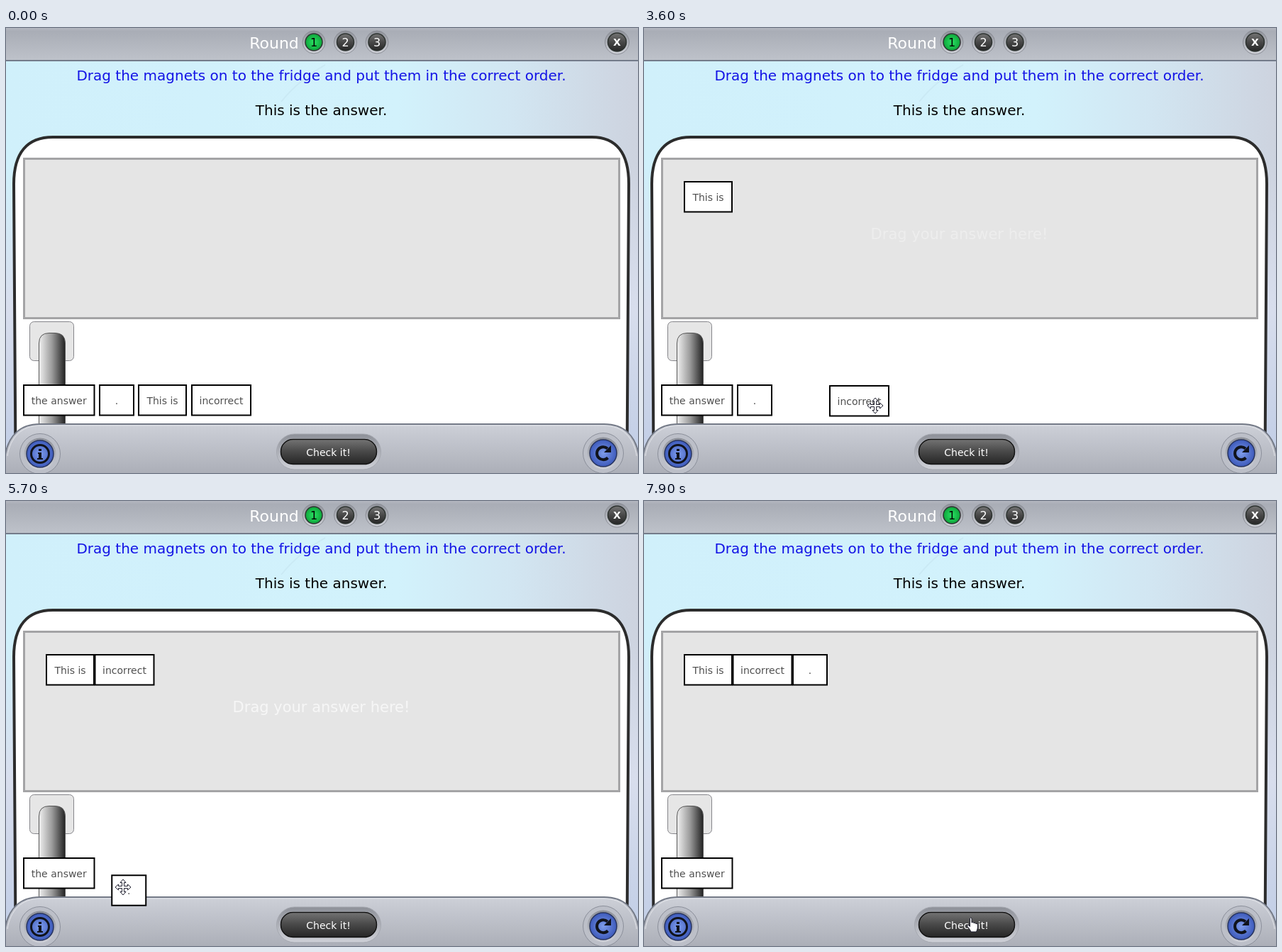
Animation, 891 px wide and 628 px high, one loop 8000 ms. Source, as an HTML page:

```html
<!DOCTYPE html>
<html lang="en">
<head>
<meta charset="utf-8">
<title>Fridge magnets</title>
<style>
html, body { margin: 0; width: 100%; height: 100%; overflow: hidden; }
svg { display: block; font-family: "DejaVu Sans", Verdana, sans-serif; }
text { text-anchor: middle; }
.magnet rect { fill: #fff; stroke: #000; stroke-width: 2; }
.magnet text { font-size: 14px; fill: #505050; }
.cursor { fill: #fff; stroke: #1c1c2c; stroke-width: 1; stroke-linejoin: round; }
</style>
</head>
<body>
<svg id="stage" width="891" height="628" viewBox="0 0 891 628">
  <defs>
    <linearGradient id="sky">
      <stop offset="0" stop-color="#d0f0fb"/><stop offset=".62" stop-color="#d2f2fc"/>
      <stop offset=".8" stop-color="#d2e6f2"/><stop offset="1" stop-color="#cdd3df"/>
    </linearGradient>
    <linearGradient id="haze" x2="0" y2="1">
      <stop offset=".25" stop-color="#d8deed" stop-opacity="0"/><stop offset=".6" stop-color="#d8deed"/>
      <stop offset="1" stop-color="#bfcce5"/>
    </linearGradient>
    <linearGradient id="header" x2="0" y2="1">
      <stop offset="0" stop-color="#b4b7c0"/><stop offset=".1" stop-color="#a9adb6"/>
      <stop offset="1" stop-color="#bec2ca"/>
    </linearGradient>
    <linearGradient id="panel" x2="0" y2="1">
      <stop offset="0" stop-color="#cdd0d8"/><stop offset="1" stop-color="#abaeb7"/>
    </linearGradient>
    <linearGradient id="bar">
      <stop offset="0" stop-color="#f0f0f0"/><stop offset=".5" stop-color="#9a9a9a"/>
      <stop offset="1" stop-color="#222"/>
    </linearGradient>
    <linearGradient id="ring" x2="0" y2="1">
      <stop offset="0" stop-color="#8d9098"/><stop offset="1" stop-color="#cfd1d8"/>
    </linearGradient>
    <linearGradient id="dark" x2="0" y2="1">
      <stop offset="0" stop-color="#747474"/><stop offset=".5" stop-color="#484848"/>
      <stop offset="1" stop-color="#262626"/>
    </linearGradient>
    <radialGradient id="green"><stop offset="0" stop-color="#2be264"/><stop offset="1" stop-color="#0da53a"/></radialGradient>
    <radialGradient id="blue"><stop offset="0" stop-color="#7d9bea"/><stop offset="1" stop-color="#3d5abb"/></radialGradient>
  </defs>

  <rect width="891" height="628" fill="url(#sky)"/>
  <rect y="46" width="891" height="582" fill="url(#haze)"/>
  <path d="M388 104Q412 74 450 52" fill="none" stroke="#c3e2ee" stroke-width="2" opacity=".5"/>

  <rect width="891" height="46" fill="url(#header)"/>
  <path d="M0 46H891" stroke="#737b8a" stroke-width="2"/>
  <text x="378" y="28.5" font-size="22" fill="#fff">Round</text>
  <g id="badges"></g>

  <text x="444.5" y="74" font-size="20" fill="#1414e6">Drag the magnets on to the fridge and put them in the correct order.</text>
  <text x="444.5" y="122.5" font-size="20">This is the answer.</text>

  <path d="M13.5 610L11 220C11 176 30 154 66 154H826C860 154 878 176 878 220L875.5 610" fill="#fff" stroke="#2c2c2c" stroke-width="4"/>
  <rect x="25.5" y="184.5" width="839" height="225" fill="#e5e5e5" stroke="#a4a4a6" stroke-width="3"/>
  <text id="hint" x="444.5" y="298" font-size="21" fill="#fff">Drag your answer here!</text>

  <rect x="33.5" y="414.5" width="62" height="55" rx="6" fill="#e6e6e6" stroke="#85858a"/>
  <path d="M46.5 560V445Q46.5 430.5 61 430.5H69Q83.5 430.5 83.5 445V560" fill="url(#bar)" stroke="#555"/>

  <path d="M-2 608C2 575 20 559 48 559H843C871 559 889 575 893 608V630H-2Z" fill="url(#panel)" stroke="#747a87" stroke-width="2"/>
  <path d="M2 604C6 578 22 561 48 561H843C869 561 885 578 889 604" fill="none" stroke="#e3e5ea"/>

  <rect x="381.5" y="573" width="147" height="50" rx="25" fill="url(#ring)" stroke="#a5a8b0"/>
  <rect x="386.5" y="579.5" width="137" height="37" rx="18" fill="#c9ccd3"/>
  <rect x="387.5" y="580.5" width="135" height="35" rx="17" fill="url(#dark)" stroke="#111" stroke-width="1.5"/>
  <text x="454.5" y="604" font-size="14" fill="#fff">Check it!</text>

  <g id="knobs"></g>
  <g transform="translate(48 601)">
    <circle r="12.5" fill="none" stroke="#10131c" stroke-width="3"/>
    <path d="M-3-2H2V6H4V8H-4V6H-2V0H-3ZM-2-7H2V-4H-2Z" fill="#10131c"/>
  </g>
  <g transform="translate(842 600)">
    <path d="M6.5 6.5A9 9 0 1 1 6-6.5" fill="none" stroke="#10131c" stroke-width="4"/>
    <path d="M11-11V-1H1Z" fill="#10131c"/>
  </g>
  <g id="magnets"></g>
  <path id="cursor" class="cursor"/>
</svg>
<script>
const $ = id => document.getElementById(id);

const badge = (x, r, label, fill, ink, style) => `
  <circle cx="${x}" cy="20" r="${r + 4}" fill="url(#ring)" stroke="#8b8e96"/>
  <circle cx="${x}" cy="20" r="${r}" fill="${fill}" stroke="#2d3330" stroke-width="1.5"/>
  <text x="${x}" y="26" ${style} fill="${ink}">${label}</text>`;

$("badges").innerHTML = [1, 2, 3].map(n =>
  badge(389.5 + 44.5 * n, 12, n, `url(#${n == 1 ? "green" : "dark"})`, n == 1 ? "#000" : "#fff", 'font-size="16"')
).join("") + badge(861.5, 13, "X", "url(#dark)", "#fff", 'font-size="14" font-weight="bold" dy="-1"');

$("knobs").innerHTML = [[48, 601], [842, 600]].map(([x, y]) => `
  <circle cx="${x}" cy="${y}" r="28.5" fill="#bcbfc8" stroke="#8b8f9a"/>
  <circle cx="${x}" cy="${y}" r="22.5" fill="url(#ring)"/>
  <circle cx="${x}" cy="${y}" r="19" fill="url(#blue)" stroke="#27345f" stroke-width="1.5"/>`).join("");

const STEP = 100, LOOP = 8000;
const clamp = (v, hi) => Math.max(0, Math.min(v, hi));
const easeOut = p => 1 - (1 - p) ** 2;

const shapes = {
  none: "",
  arrow: "M.5.5V16L4 12.5 6.5 18.5 9 17.5 6.5 11.5H11.5Z",
  move: "M0-11L4-6.5H1.5V-1.5H6.5V-4L11 0 6.5 4V1.5H1.5V6.5H4L0 11-4 6.5H-1.5V1.5H-6.5V4L-11 0-6.5-4V-1.5H-1.5V-6.5H-4Z",
  hand: "M4.5 2Q5.7 0 7 2V8Q9 6.5 10 8.5Q12 7.5 12.7 9.5Q15 8.5 15.5 11V15Q15 18 13.5 21H6Q5 18 1 13.5Q0 11 2 11L4.5 13.5Z"
};

// Pointer moves: start, duration, destination, shape
const moves = [
  [0, 0, 0, 0, "none"],
  [200, 0, 818, 538, "arrow"],
  [300, 0, 205, 640, "none"],
  [800, 0, 205, 603, "arrow"],
  [900, 200, 225, 518, "move"],
  [1500, 0, 225, 466, "move"],
  [1600, 300, 114, 223, "move"],
  [2800, 400, 355, 551, "arrow"],
  [3300, 0, 291, 524, "move"],
  [3600, 0, 326, 533, "move"],
  [3700, 600, 171, 224, "move"],
  [5000, 300, 180, 495, "arrow"],
  [5400, 100, 142, 514, "move"],
  [5600, 100, 165, 545, "move"],
  [5800, 500, 251, 215, "move"],
  [6500, 300, 239, 217, "move"],
  [7400, 400, 440, 570, "arrow"],
  [7900, 0, 455, 587, "hand"]
];

function pointer(t) {
  const i = moves.findLastIndex(m => m[0] <= t);
  const [start, time, x, y, shape] = moves[i];
  const [, , x0, y0] = moves[Math.max(0, i - 1)];
  const p = easeOut(clamp((t - start + STEP) / (time + STEP), 1));
  return { x: x0 + (x - x0) * p, y: y0 + (y - y0) * p, shape };
}

// hide: when the hint has faded out after the drop
const magnets = [
  { label: "the answer", x: 24, w: 101.5 },
  { label: ".", x: 131, w: 50, grab: 5600, drop: 6500, hide: 6400, grip: [11, 10] },
  { label: "incorrect", x: 261, w: 85, grab: 3600, drop: 4700, hide: 5000, grip: [30, 20] },
  { label: "This is", x: 186, w: 69, grab: 1500, drop: 2300, hide: 2600, grip: [22, 20] }
];
const drags = magnets.filter(m => m.grab).sort((a, b) => a.grab - b.grab);
drags.reduce((x, m) => (m.slot = x) + m.w - .5, 56);

// A dragged magnet trails the pointer by one step.
function magnetAt(m, t) {
  if (t >= m.drop) return [m.slot, 216];
  if (!(t >= m.grab)) return [m.x, 503];
  const { x, y } = pointer(t - STEP);
  return [x - m.grip[0], y - m.grip[1]];
}

const hintAlpha = t => Math.max(...drags.map(({ grab, hide }) =>
  Math.min(clamp((t - grab + STEP) / 300, .85), clamp((hide - t) / 125, .85))));

const place = (node, x, y) => node.setAttribute("transform", `translate(${x} ${y})`);

$("magnets").innerHTML = magnets.map(({ label, w }) => `<g class="magnet">
  <rect x="1" y="1" width="${w - 2}" height="42.5"/>
  <text x="${w / 2}" y="28">${label}</text></g>`).join("");
const nodes = [...$("magnets").children];

function draw() {
  const t = Math.floor(performance.now() % LOOP / STEP) * STEP;
  magnets.forEach((m, i) => place(nodes[i], ...magnetAt(m, t)));
  $("hint").setAttribute("opacity", hintAlpha(t));
  const { x, y, shape } = pointer(t);
  $("cursor").setAttribute("d", shapes[shape]);
  place($("cursor"), x, y);
  requestAnimationFrame(draw);
}
draw();
</script>
</body>
</html>
```
